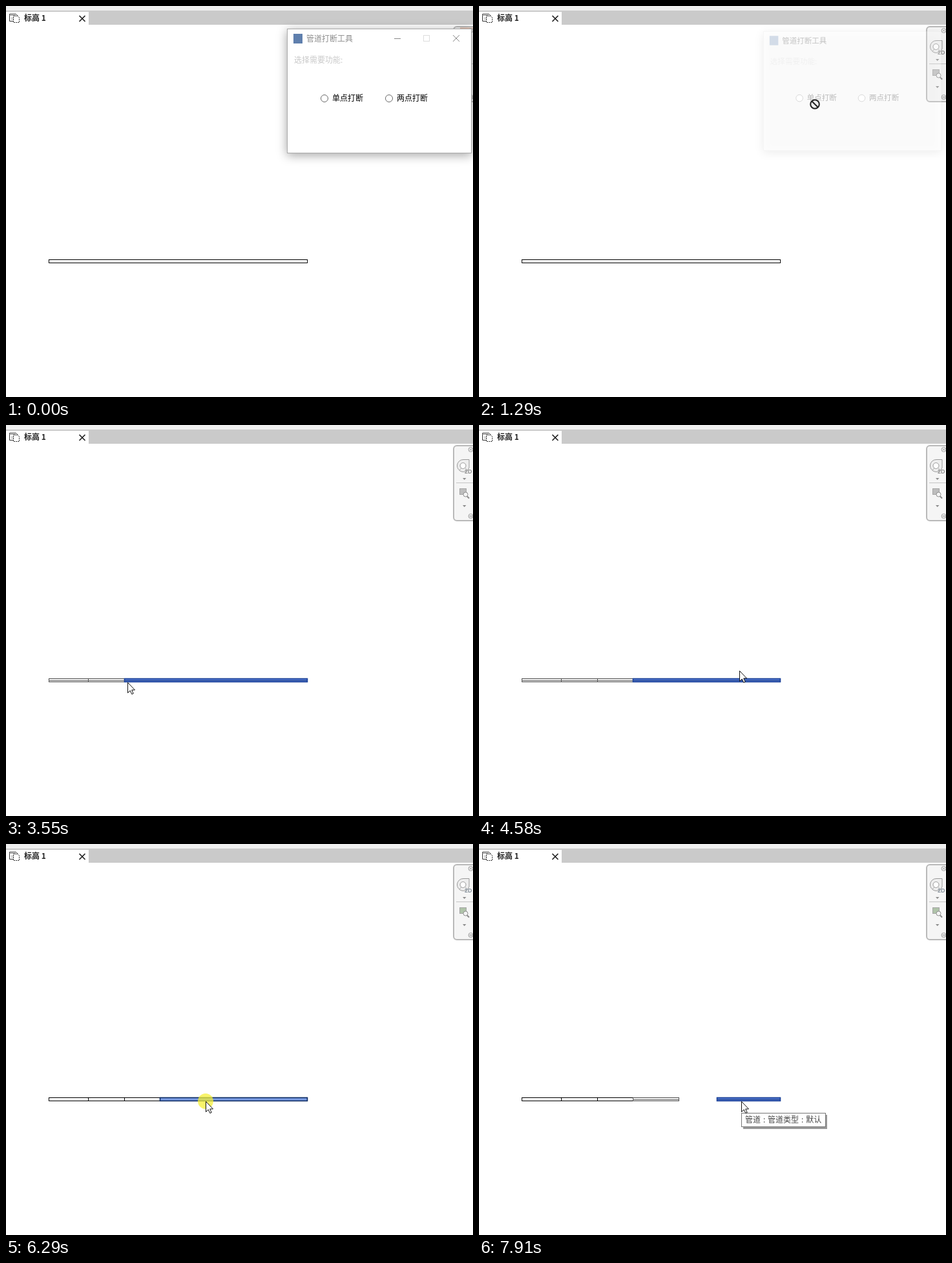
Animation of 723 by 605 pixels, one loop 8000 ms. Source, as an HTML page:

```html
<!DOCTYPE html>
<html lang="zh-CN">
<head>
<meta charset="utf-8">
<title>管道打断工具</title>
<style>
  html, body { margin: 0; width: 100%; height: 100%; overflow: hidden; background: #fff; }
  svg { display: block; width: 723px; height: 605px; }
  text { font: 12px "Noto Sans CJK SC", "Noto Sans CJK", sans-serif; white-space: pre; }
  .crisp { shape-rendering: crispEdges; }
  #panel { filter: drop-shadow(0 3px 8px rgba(0, 0, 0, .36)); }
  #nav.dim { filter: grayscale(1); }
</style>
</head>
<body>
<svg viewBox="0 0 723 605">
  <rect width="723" height="605" fill="#fff"/>

  <g class="crisp">
    <rect width="723" height="7" fill="#f0f0f0"/>
    <rect y="7" width="723" height="22" fill="#cacaca"/>
    <rect y="9" width="128" height="20" fill="#fff"/>
  </g>
  <g fill="#fff" stroke="#333">
    <path d="M5.500 12.500H15.500L18 15V23.500H5.500Z"/>
    <path d="M5.500 14.500H15" stroke="#888"/>
    <path d="M8 18.500H12M8 20.500H12" stroke="#777" stroke-dasharray="1 1"/>
    <path d="M11.500 15.500H18L20.500 18V25.500H11.500Z" stroke-dasharray="2 1"/>
  </g>
  <text x="28" y="23" style="font-weight:700" fill="#222">标高 1</text>
  <path d="M113.500 15L122.500 24M122.500 15L113.500 24" stroke="#222" stroke-width="1.700"/>

  <g id="nav">
    <rect x="693" y="32" width="40" height="116" rx="5" fill="#f5f5f5" stroke="#b9b9b9" stroke-width="2"/>
    <path id="glow" d="M703 34.500H723" stroke="#e3b9a5" stroke-width="2"/>
    <g fill="#eee" stroke="#a2a2a2">
      <circle cx="719.500" cy="38" r="3.500"/>
      <path d="M718 36.500L721 39.500M721 36.500L718 39.500"/>
      <circle cx="719.500" cy="141" r="3.500"/>
      <path d="M717.500 140.500H722M717.500 142H722" stroke-width=".8"/>
      <path d="M717 66A9.500 9.500 0 1 1 708 53.500H717V66" stroke="#999"/>
      <circle cx="707.500" cy="63" r="4.500" fill="#fff" stroke="#999"/>
      <path d="M702 70L705 66.500M710.500 66.500L713 68.500" stroke="#aaa"/>
    </g>
    <text x="710" y="75" style="font:bold 9px 'Liberation Sans',sans-serif" fill="#87929c">2D</text>
    <path d="M707 82H712.500L709.700 85ZM707 124H712.500L709.700 127Z" fill="#8b8b8b"/>
    <path d="M697 89.500H723" stroke="#c4c4c4"/>
    <rect x="702.500" y="98.500" width="10" height="9" fill="#afc3a9" stroke="#a5a5a5"/>
    <path d="M713.500 110L717 113.500" stroke="#888" stroke-width="2"/>
    <circle cx="711.500" cy="107.500" r="3.500" fill="#f5f5f5" stroke="#8d8d8d"/>
  </g>

  <g id="pipes"></g>

  <g id="panel">
    <rect id="sheet" class="crisp" x="435.500" y="35.500" width="285" height="192" fill="#fff"/>
    <rect x="445" y="43" width="14" height="15" fill="#5f7fad"/>
    <text id="title" x="465" y="55">管道打断工具</text>
    <g id="buttons" fill="none">
      <path class="crisp" d="M601 50.500H611" stroke="#888"/>
      <rect class="crisp" x="646.500" y="45.500" width="9" height="9" stroke="#ddd"/>
      <path d="M692 45L702 55M702 45L692 55" stroke="#8a8a8a"/>
    </g>
    <text x="446" y="88" fill="#c9c9c9">选择需要功能:</text>
    <circle id="one" cx="493" cy="143" r="5.500"/>
    <circle id="dot" cx="493" cy="143" r="3" fill="#333"/>
    <text x="505" y="147">单点打断</text>
    <circle id="two" cx="593" cy="143" r="5.500"/>
    <text x="605" y="147">两点打断</text>
  </g>

  <circle id="click" r="12" fill="#f5f032" fill-opacity=".72"/>

  <g id="tip">
    <rect x="3" y="21" width="130" height="22" fill="#777" opacity=".75"/>
    <rect class="crisp" x=".5" y="18.500" width="130" height="21" fill="#fff" stroke="#767676"/>
    <text x="6" y="33" fill="#444" word-spacing="1.2">管道 : 管道类型 : 默认</text>
  </g>

  <g id="cursor">
    <path id="arrow" d="M.5 .5V16.500L4.200 13L6.800 18.500L9.200 17.500L6.700 12H11.500Z" fill="#fff" stroke="#111"/>
    <g id="deny" fill="none" stroke="#222" stroke-width="2">
      <circle cx="8" cy="8" r="6.800" fill="#eee"/>
      <path d="M3.200 3.200L12.800 12.800"/>
    </g>
  </g>
</svg>
<script>
const LOOP = 8000, STEP = 65, LEFT = 66, RIGHT = 467;
const $ = id => document.getElementById(id);

// Pointer moves: start ms, end ms, then where it comes to rest
const moves = [
  [130, 690, 512, 144], [1400, 1840, 130, 398], [1910, 2130, 128, 391],
  [2470, 2600, 143, 398], [2670, 2930, 184, 398], [3420, 4160, 238, 398],
  [4370, 4580, 403, 380], [4650, 5330, 628, 142], [5560, 5620, 625, 154],
  [5690, 6030, 309, 398], [6430, 6760, 368, 396], [7100, 7650, 406, 398]
];
const entry = { x: 702, y: 592 };

// Clicks in order: pick a tool, three single cuts, pick a tool, both ends of a gap
const clicks = [630, 2330, 3140, 4230, 5340, 6290, 6960];
const cuts = clicks.slice(1, 4).map((c, i) => ({ time: c + STEP, x: [127, 183, 238][i] }));
const gap = { time: clicks[6] + STEP, from: 309, to: 368 };

const hides = [1155, 5555], reopen = 4800, opened = 4990;

const styles = {
  plain: { fill: "#fff", line: "#000", width: 1 },
  hover: { fill: "#7b9ce2", line: "#0d2b63", width: 1.6 },
  thin: { fill: "#f4f4f4", line: "#505050", width: 1, mid: "#606060" },
  deep: { fill: "#4f75cc", line: "#1c429a", width: 1.6, mid: "#24458f" }
};

const within = (t, a, b) => t >= a && t < b;
const clamp = v => Math.min(1, Math.max(0, v));
const smooth = p => p * p * (3 - 2 * p);
const show = (id, on) => $(id).style.display = on ? "" : "none";

// Vertical travel runs slightly ahead, which bows the path
function pointer(t) {
  let { x, y } = entry;
  for (const [from, to, nx, ny] of moves) {
    const p = smooth(clamp((t - from) / (to - from)));
    x += (nx - x) * p;
    y += (ny - y) * p ** .75;
  }
  return [Math.round(x), Math.round(y)];
}

function opacity(t) {
  if (within(t, reopen - 1000, opened)) return clamp((t - reopen) / (opened - reopen));
  const n = Math.max(0, Math.floor((t - hides[t < reopen ? 0 : 1]) / STEP));
  return clamp(1 - (n / 2.5) ** 1.4);
}

function segments(t) {
  const ends = [LEFT, ...cuts.filter(c => t >= c.time).map(c => c.x)];
  const parts = ends.map((x, i) => [x, ends[i + 1] || RIGHT, "plain"]);
  const last = parts[parts.length - 1];
  if (within(t, cuts[0].time, reopen + STEP)) {
    parts.forEach(p => p[2] = "thin");
    last[2] = "deep";
  } else if (t >= gap.time) {
    last[1] = gap.from;
    last[2] = "thin";
    parts.push([gap.to, RIGHT, "deep"]);
  } else if (within(t, 1820, reopen) || t >= 5960) {
    last[2] = "hover";
  }
  return parts;
}

function pipe([left, right, name]) {
  const s = styles[name], w = right - left - (right === RIGHT ? 1 : 0);
  const crisp = s.width === 1 ? ' class="crisp"' : "";
  const mid = s.mid ? `<path class="crisp" d="M${left} 395.500h${w}" stroke="${s.mid}"/>` : "";
  return `<rect${crisp} x="${left + .5}" y="392.500" width="${w}" height="5" fill="${s.fill}" stroke="${s.line}" stroke-width="${s.width}"/>${mid}`;
}

function radio(id, hot) {
  $(id).setAttribute("fill", hot ? "#dfecfa" : "#fff");
  $(id).setAttribute("stroke", hot ? "#7f9fc4" : "#6a6a6a");
}

function draw(t) {
  $("pipes").innerHTML = segments(t).map(pipe).join("");

  const o = opacity(t), k = .95 + .05 * o, idle = t < 1090;
  show("panel", o > 0);
  $("panel").setAttribute("opacity", o);
  $("panel").setAttribute("transform", `translate(578 131.500) scale(${k}) translate(-578 -131.500)`);
  $("sheet").setAttribute("fill-opacity", o < 1 ? .75 : 1);
  $("sheet").setAttribute("stroke", idle ? "#a9a9a9" : "#ddd");
  $("title").setAttribute("fill", idle ? "#8c8c8c" : "#222");
  show("buttons", idle);
  show("glow", idle);
  show("dot", t > reopen);
  radio("one", within(t, 620, 1090));
  radio("two", within(t, 5060, 5800));
  $("nav").setAttribute("class", within(t, 1220, reopen + STEP) ? "dim" : "");

  const move = `translate(${pointer(t).join(" ")})`;
  for (const id of ["cursor", "click", "tip"]) $(id).setAttribute("transform", move);
  const denied = within(t, hides[0], 1410);
  show("cursor", t >= 130);
  show("arrow", !denied);
  show("deny", denied);
  show("click", clicks.some(c => within(t, c, c + 2 * STEP)));
  show("tip", within(t, 3040, clicks[2]) || t >= 7910);
}

const start = performance.now();
function tick(now) {
  draw(Math.max(0, now - start) % LOOP);
  requestAnimationFrame(tick);
}
draw(0);
requestAnimationFrame(tick);
</script>
</body>
</html>
```
